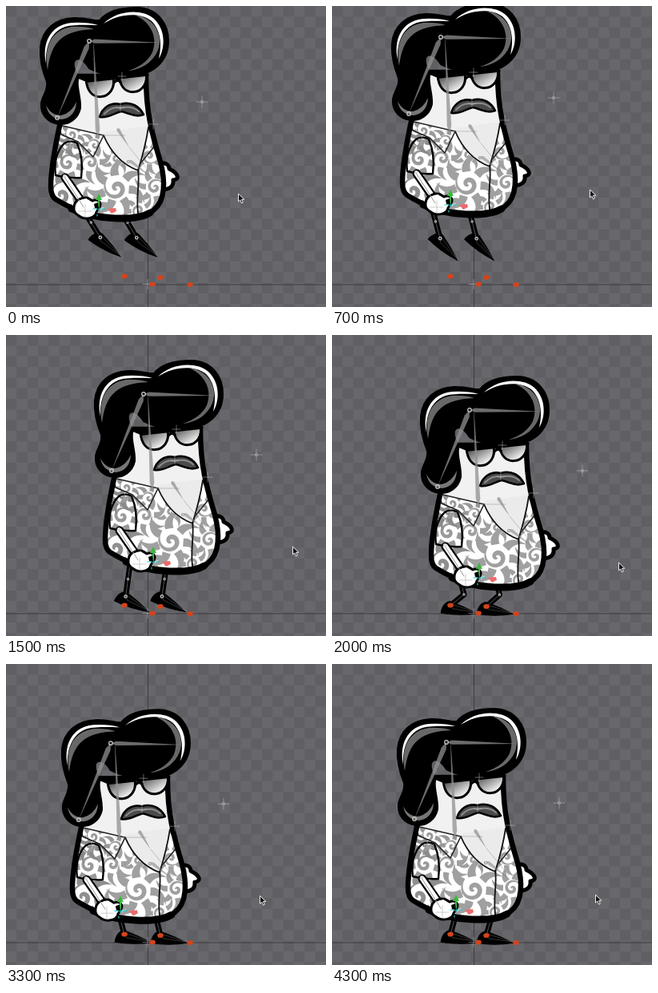
An HTML page with a canvas for the animation above (4400 ms loop, 400x377 px).

```html
<!DOCTYPE html>
<html>
<head>
<meta charset="utf-8">
<style>
html, body { margin: 0; width: 100%; height: 100%; overflow: hidden; background: #646469; }
canvas { display: block; }
</style>
</head>
<body>
<canvas width="400" height="377"></canvas>
<script>
const ctx = document.querySelector('canvas').getContext('2d');
const LOOP = 4400, STEP = 100, TILE = 13.33;

// Drag path of the rigid body: time, x, y
const KEYS = [
  [0, -68, -50], [200, -40, -32], [400, 33, -27], [550, -5, -50], [700, -36, -55],
  [800, -37, -53], [1000, -14, -47], [1200, 2, -44], [1500, 0, -20], [1750, 2, 3],
  [2000, 0, 0], [2250, -1, -3], [2400, -5, -3], [2600, -8, 2], [2800, -5, -6],
  [3000, -8, 5], [3250, -43, 5], [3550, -9, 6], [3800, -1, 3], [4100, -37, 2],
  [4200, -32, 4], [4300, -29, 4]
];

function slope(i, axis) {
  const a = KEYS[Math.max(i - 1, 0)], b = KEYS[Math.min(i + 1, KEYS.length - 1)];
  return (b[axis] - a[axis]) / (b[0] - a[0]);
}

function offsetAt(t) {
  let i = 0;
  while (i < KEYS.length - 2 && t >= KEYS[i + 1][0]) i++;
  const a = KEYS[i], b = KEYS[i + 1], d = b[0] - a[0], u = Math.min(1, (t - a[0]) / d);
  return [1, 2].map(k =>
    a[k] * (1 + 2 * u) * (1 - u) ** 2 + b[k] * u * u * (3 - 2 * u) +
    d * (slope(i, k) * u * (1 - u) ** 2 - slope(i + 1, k) * u * u * (1 - u)));
}

function shape(d, fill, stroke, width = 2) {
  const p = new Path2D(d);
  if (fill) { ctx.fillStyle = fill; ctx.fill(p); }
  if (stroke) { ctx.strokeStyle = stroke; ctx.lineWidth = width; ctx.stroke(p); }
}

function clipped(d, draw) {
  ctx.save();
  ctx.clip(new Path2D(d));
  draw();
  ctx.restore();
}

function cross(x, y, r = 4, color = 'rgba(205,205,205,.6)') {
  shape(`M${x - r},${y}h${2 * r}M${x},${y - r}v${2 * r}`, null, color, .8);
}

function ring(x, y, r = 2.3, color = '#ccc') {
  ctx.beginPath();
  ctx.arc(x, y, r, 0, 7);
  ctx.strokeStyle = color;
  ctx.lineWidth = 1.2;
  ctx.stroke();
}

function bone(x1, y1, x2, y2, w, color = 'rgba(145,145,145,.75)') {
  const len = Math.hypot(x2 - x1, y2 - y1), nx = (y1 - y2) / len * w, ny = (x2 - x1) / len * w;
  const mx = x1 + (x2 - x1) * .08, my = y1 + (y2 - y1) * .08;
  shape(`M${x1},${y1}L${mx + nx},${my + ny}L${x2},${y2}L${mx - nx},${my - ny}Z`, color);
}

// Tapered spiral with a wreath of curved leaves around it
function swirl(x, y, r, turn, dir = 1, color = '#a0a0a0') {
  ctx.save();
  ctx.translate(x, y);
  ctx.rotate(turn);
  ctx.scale(dir, 1);
  ctx.fillStyle = color;
  ctx.beginPath();
  for (let side = 0; side < 2; side++) {
    for (let i = 0; i <= 40; i++) {
      const u = (side ? 40 - i : i) / 40, a = u * 9.5;
      const rad = r * (.1 + .9 * u) - (side ? r * .36 * Math.sin(u * Math.PI) ** .7 : 0);
      ctx.lineTo(Math.cos(a) * rad, Math.sin(a) * rad);
    }
  }
  ctx.fill();
  for (let i = 0; i < 7; i++) {
    ctx.rotate(Math.PI * 2 / 7);
    ctx.beginPath();
    ctx.moveTo(r * .95, -r * .1);
    ctx.bezierCurveTo(r * 1.5, -r * .1, r * 2, r * .4, r * 1.95, r * 1.3);
    ctx.bezierCurveTo(r * 1.7, r * .7, r * 1.3, r * .5, r * .85, r * .5);
    ctx.fill();
  }
  ctx.restore();
}

function background() {
  ctx.fillStyle = '#67676c';
  ctx.fillRect(0, 0, 400, 377);
  ctx.fillStyle = 'rgba(0,0,0,.08)';
  for (let j = 0; j < 30; j++)
    for (let i = j % 2; i < 32; i += 2) ctx.fillRect(i * TILE, j * TILE, TILE, TILE);
  shape('M177.5,0V377M0,349H400', null, '#3d3d41', 1);
}

const THIGH = 33, SHIN = 22;

function leg(hx, hy, tx, ty, toeX, toeY) {
  const dist = Math.hypot(tx - hx, ty - hy), reach = Math.min(dist, THIGH + SHIN);
  const dir = Math.atan2(ty - hy, tx - hx);
  const bend = Math.acos(Math.min(1, (THIGH ** 2 + reach ** 2 - SHIN ** 2) / (2 * THIGH * reach)));
  const kx = hx + Math.cos(dir - bend) * THIGH, ky = hy + Math.sin(dir - bend) * THIGH;
  const ax = hx + Math.cos(dir) * reach, ay = hy + Math.sin(dir) * reach;
  const bones = `M${hx},${hy}L${kx},${ky}L${ax},${ay}`;
  shape(bones, null, '#000', 7);
  ctx.save();
  ctx.translate(ax, ay);
  ctx.rotate(Math.atan2(toeY - ay, toeX - ax));
  shape('M-9,12C-11,3 -6,-5 -1,-5C9,-4 22,-2 35,1Q14,10 -9,12Z', '#000', '#000', 1);
  shape('M1,-2L35,0L4,3Z', null, 'rgba(190,190,190,.4)', .6);
  ctx.restore();
  shape(bones, null, 'rgba(210,210,210,.5)', .8);
  ring(kx, ky, 1.2, '#aaa');
  ring(ax, ay, 1.7, '#ccc');
}

const BODY = 'M150,138C142,165 137,185 135,200C129,228 124,255 124,276Q124,288 130,292Q146,302 163,308C185,318 236,320 252,306C268,294 267,268 261,245C254,222 250,205 248,195Q243,170 243,138Z';
const SHIRT = 'M130,198L190,212L233,256L247,198L275,200V330H110V200Z';
const SLEEVE = 'M141,222C131,231 128,247 130,262Q147,266 162,265C164,250 163,236 157,222Q149,217 141,222Z';
const COLLAR = 'M134,199L190,212L177,239L158,220L137,211Z';
const HAIR = 'M185,68C195,55 214,52 232,52C258,53 271,72 271,94C271,119 252,137 222,138C200,139 185,135 172,128C166,118 157,112 153,120C151,130 157,133 158,142C156,152 162,165 161,178C158,192 146,199 134,198C119,196 111,185 112,172C113,162 121,156 119,145C113,130 110,115 111,102C113,79 130,66 152,65C168,64 178,69 185,68Z';

function torso() {
  shape('M256,252C262,243 272,247 272,254C283,259 286,267 277,268C278,277 270,282 259,278Z', '#fff', '#000', 5);
  shape(BODY, '#f1f1f1');
  clipped(BODY, () => {
    clipped(SHIRT, () => {
      ctx.fillStyle = '#fff';
      ctx.fillRect(100, 190, 180, 140);
      swirl(206, 278, 17, .8);
      swirl(174, 246, 12, 2.4, -1);
      swirl(175, 303, 12, 4);
      swirl(234, 306, 10, 1, -1);
      swirl(254, 277, 12, 3);
      swirl(247, 238, 11, .4, -1);
      swirl(206, 242, 9, 5);
      swirl(137, 287, 17, 1.7, 1, '#8f8f8f');
      swirl(142, 212, 14, 2, 1, '#8d8d8d');
    });
    // Open neck
    shape('M190,208L198,228Q214,251 233,257Q241,228 247,200Z', '#ebebeb');
  });
  shape('M233,255C236,272 229,292 234,316', null, '#111', 1.8);
  shape('M190,212Q204,245 233,256Q242,228 246,202', null, '#111', 1.8);
  shape(COLLAR, '#fff');
  clipped(COLLAR, () => { swirl(150, 211, 9, 1, 1, '#999'); swirl(179, 224, 9, 3, -1, '#999'); });
  shape(COLLAR, null, '#222', 1.6);
  shape('M246,203L255,224L237,246', null, '#222', 1.6);
  shape(BODY, null, '#000', 6.5);
  shape('M150,304C180,318 230,320 248,309', null, '#000', 9);
  // Near arm
  shape(SLEEVE, '#fff');
  clipped(SLEEVE, () => {
    swirl(145, 247, 13, 2.8, 1, '#9a9a9a');
    swirl(144, 222, 10, 1, -1, '#8a8a8a');
  });
  shape(SLEEVE, null, '#000', 2.4);
  shape('M142,265L166,300', null, '#000', 11);
  shape('M142,265L167,301', null, '#fff', 6.5);
  shape('M160,292C152,295 150,308 158,312C166,319 180,316 181,308L185,302C188,296 183,291 176,294Q168,287 160,292Z', '#fff', '#000', 3);
  shape('M158,294L169,291L176,306L164,310Z', '#fff');
}

// Lens tilted about its upper left corner
function lens(x, y) {
  const g = ctx.createLinearGradient(0, 0, 12, 24);
  g.addColorStop(0, '#404040');
  g.addColorStop(.45, '#8a8a8a');
  g.addColorStop(1, '#e8e8e8');
  ctx.save();
  ctx.translate(x, y);
  ctx.rotate(-.08);
  shape('M0,0H34C36,14 27,23 17,23C6,23 0,14 0,0Z', g, '#000', 3);
  ctx.restore();
}

function head() {
  lens(168, 142);
  lens(209, 136);
  shape('M158,139L170,144L245,136M203,146Q207,141 211,145', null, '#000', 3.5);
  shape(HAIR, '#000', '#000', 2);
  // Hair sheen
  shape('M118,122C113,98 122,74 150,71Q170,70 183,74C170,74 153,73 142,76C125,82 117,99 118,122Z', '#fff');
  shape('M120,130C115,102 124,80 150,76Q166,75 178,79Q151,80 138,90C126,99 122,114 120,130Z', '#686868');
  shape('M190,72C207,55 238,53 253,66C268,80 267,103 259,116C263,99 262,80 249,68C234,57 208,60 190,72Z', '#fff');
  shape('M228,61C257,64 269,94 253,114C245,125 232,130 221,131Q243,124 251,108C259,88 247,68 228,61Z', '#686868');
  shape('M118,174Q121,191 138,192Q155,189 156,170Q150,184 137,187Q124,187 118,174Z', '#777');
  shape('M185,189C188,178 198,170 211,173C225,169 235,176 240,186C230,190 221,184 212,182C203,184 196,191 185,189Z', '#4a4a4a', '#000', 2.6);
  shape('M191,185Q201,175 211,178Q225,174 234,182', null, '#8c8c8c', 2);
}

function rig() {
  bone(172, 94, 262, 96, 2.6);
  bone(172, 94, 132, 190, 3.2);
  bone(183, 215, 177, 88, 2.8);
  bone(207, 203, 222, 227, 2.2);
  bone(222, 243, 253, 267, 2, 'rgba(130,130,130,.55)');
  shape('M222,227L250,261M178,212L217,212', null, 'rgba(130,130,130,.45)', 1);
  shape('M141,264L165,302', null, '#999', 1);
  ring(172, 94);
  ring(132, 190);
  ring(141, 263, 1.5);
  ring(221, 245, 1.5, '#999');
  cross(313, 170, 7);
  ring(313, 170, 1.6, 'rgba(170,170,170,.7)');
  cross(252, 198, 6);
  cross(213, 138, 5);
  cross(211, 177, 5);
  cross(148, 222, 4);
  cross(167, 307, 8, 'rgba(150,150,150,.6)');
  // Transform handles
  shape('M184,306V292M177,304H192M182,311V313', null, '#18c9c4', 1.2);
  shape('M180,293L184,285L188,293Z', '#38b83c');
  shape('M184,293V301', null, '#38b83c', 2);
  shape('M195,304L205,303L206,307L200,310Z', '#f06a6a');
  shape('M178,298L183,296L184,304L179,303Z', '#000');
}

function draw(t) {
  const [dx, dy] = offsetAt(t);
  background();
  ctx.lineJoin = ctx.lineCap = 'round';
  leg(157 + dx, 293 + dy, 148, 339, 183, 348);
  leg(203 + dx, 293 + dy, 193, 340, 230, 349);
  ctx.save();
  ctx.translate(dx, dy);
  torso();
  head();
  rig();
  shape('M358.5,285.5V295L360.8,293L362.5,297L364.3,296L362.6,292.3H365.5Z', '#111', '#eee', 1);
  ctx.restore();
  cross(177, 348.5, 6);
  for (const [x, y] of [[148, 338.5], [193, 340], [183, 348.5], [230, 349]])
    shape(`M${x - 4},${y - 1}L${x - 1},${y - 3}L${x + 3},${y - 2.5}L${x + 4},${y + 1}L${x + 1},${y + 3}L${x - 3},${y + 2.5}Z`, '#d4441c');
}

function frame() {
  draw(Math.floor(performance.now() % LOOP / STEP) * STEP);
  requestAnimationFrame(frame);
}
frame();
</script>
</body>
</html>
```
